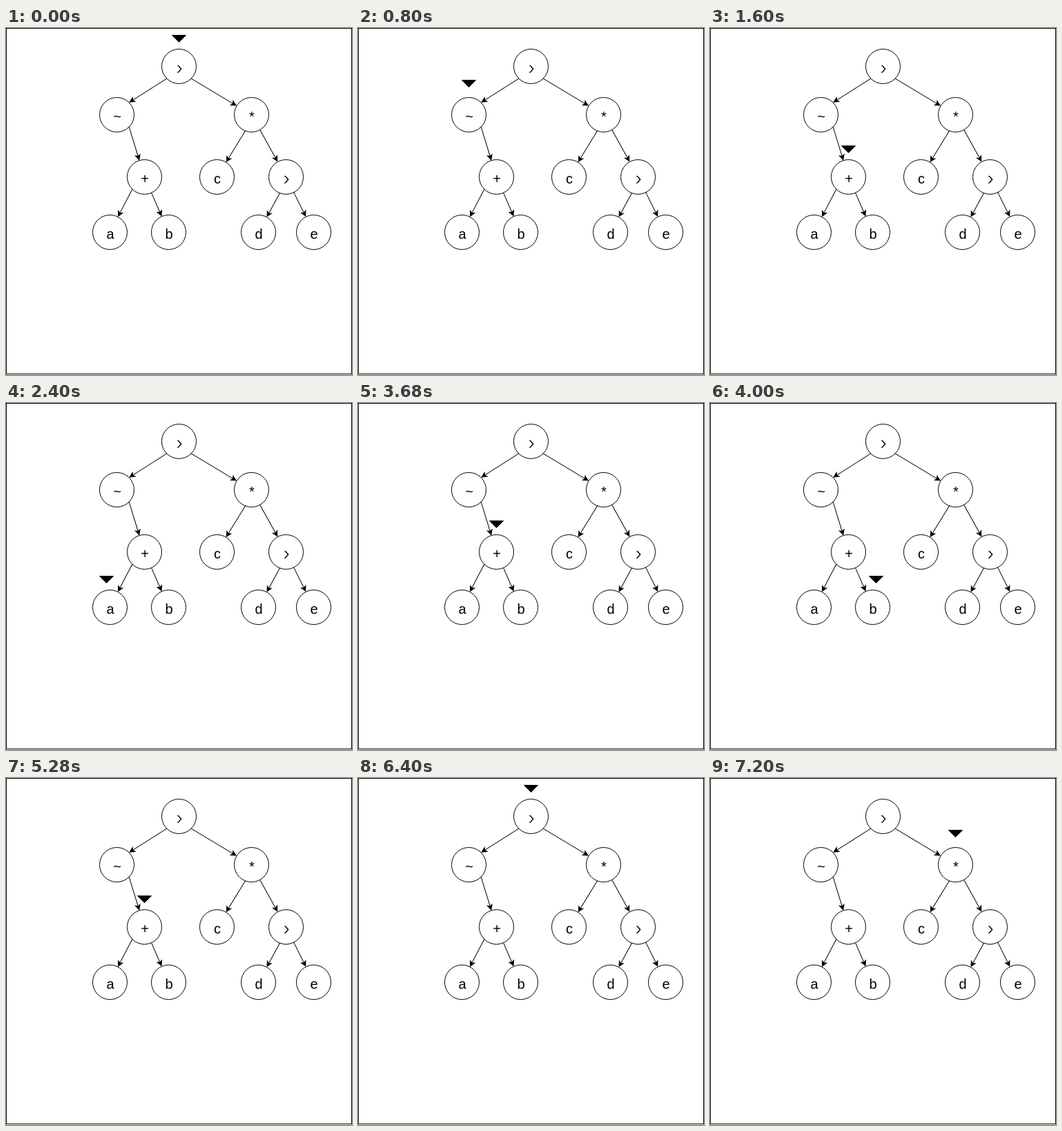
These frames come from a looping animation (501 by 502 pixels, 8000 ms). An HTML page:

```html
<!DOCTYPE html>
<html lang="en">
<head>
<meta charset="utf-8">
<style>
  html, body { margin: 0; width: 100%; height: 100%; overflow: hidden; background: #fff; }
  svg { display: block; }
  text { font: 20px "Liberation Sans", Arial, sans-serif; text-anchor: middle; }
  .chevron { font-size: 29px; stroke: #fff; stroke-width: .6; }
</style>
</head>
<body>
<svg width="501" height="502" viewBox="0 0 501 502">
  <g id="tree" transform="translate(.5 .5)">
    <rect width="500" height="500" fill="#fff" stroke="#000"/>
  </g>
  <path id="marker" d="M-10 0H10L0 10Z" stroke="#000"/>
</svg>
<script>
const RADIUS = 25, STEP = 800, STOPS = 10;
const ROW_Y = [55, 125, 215, 295];
const tree = document.getElementById('tree');
const marker = document.getElementById('marker');

// exit and enter are optional arrow angles on the parent and child circles, in degrees
const node = (label, x, children = [], exit, enter) => ({ label, x, children, exit, enter });
const root = node('>', 250, [
  node('~', 160, [
    node('+', 200, [node('a', 150, [], 135), node('b', 235)], 45)
  ], 135, -45),
  node('*', 355, [
    node('c', 305, [], 111),
    node('>', 405, [node('d', 365, [], 111), node('e', 445)])
  ], 45)
]);

function add(tag, attrs, text = '') {
  const el = document.createElementNS('http://www.w3.org/2000/svg', tag);
  for (const key in attrs) el.setAttribute(key, attrs[key]);
  el.textContent = text;
  tree.append(el);
}

const angleTo = (p, q) => Math.atan2(q.y - p.y, q.x - p.x) * 180 / Math.PI;

function onRim({ x, y }, degrees) {
  const t = degrees * Math.PI / 180;
  return { x: x + RADIUS * Math.cos(t), y: y + RADIUS * Math.sin(t) };
}

function drawArrow(parent, child) {
  const start = onRim(parent, child.exit ?? angleTo(parent, child));
  const tip = onRim(child, child.enter ?? angleTo(child, start));
  const length = Math.hypot(tip.x - start.x, tip.y - start.y);
  add('path', {
    d: `M${-length} 0H-6.4M-1.1 0L-8.1 3.5L-6.4 0L-8.1 -3.5Z`,
    transform: `translate(${tip.x} ${tip.y}) rotate(${angleTo(start, tip)})`,
    stroke: '#000'
  });
}

function drawNode({ label, x, y }) {
  add('circle', { cx: x, cy: y, r: RADIUS, fill: '#fff', stroke: '#000' });
  if (label === '>') add('text', { x: x + .5, y: y + 11.5, class: 'chevron' }, '›');
  else add('text', { x: x + .5, y: y + 9.5 }, label);
}

// Draws the tree depth first and records where the marker stops on the way
const stops = [];
function visit(current, depth = 0, parent) {
  current.y = ROW_Y[depth];
  const { x, y, children } = current;
  drawNode(current);
  if (parent) drawArrow(parent, current);

  // Leaf markers keep clear of the arrow; the first stop below the root sits higher
  const shift = children.length ? 0 : 5 * Math.sign(x - parent.x);
  stops.push([x + shift, y - (depth === 1 ? 50 : 45)]);
  for (const child of children) {
    visit(child, depth + 1, current);
    stops.push([x, y - 45]);
  }
}
visit(root);

function draw() {
  const [x, y] = stops[Math.floor(performance.now() / STEP) % STOPS];
  marker.setAttribute('transform', `translate(${x + .5} ${y + .5})`);
  requestAnimationFrame(draw);
}
draw();
</script>
</body>
</html>
```
